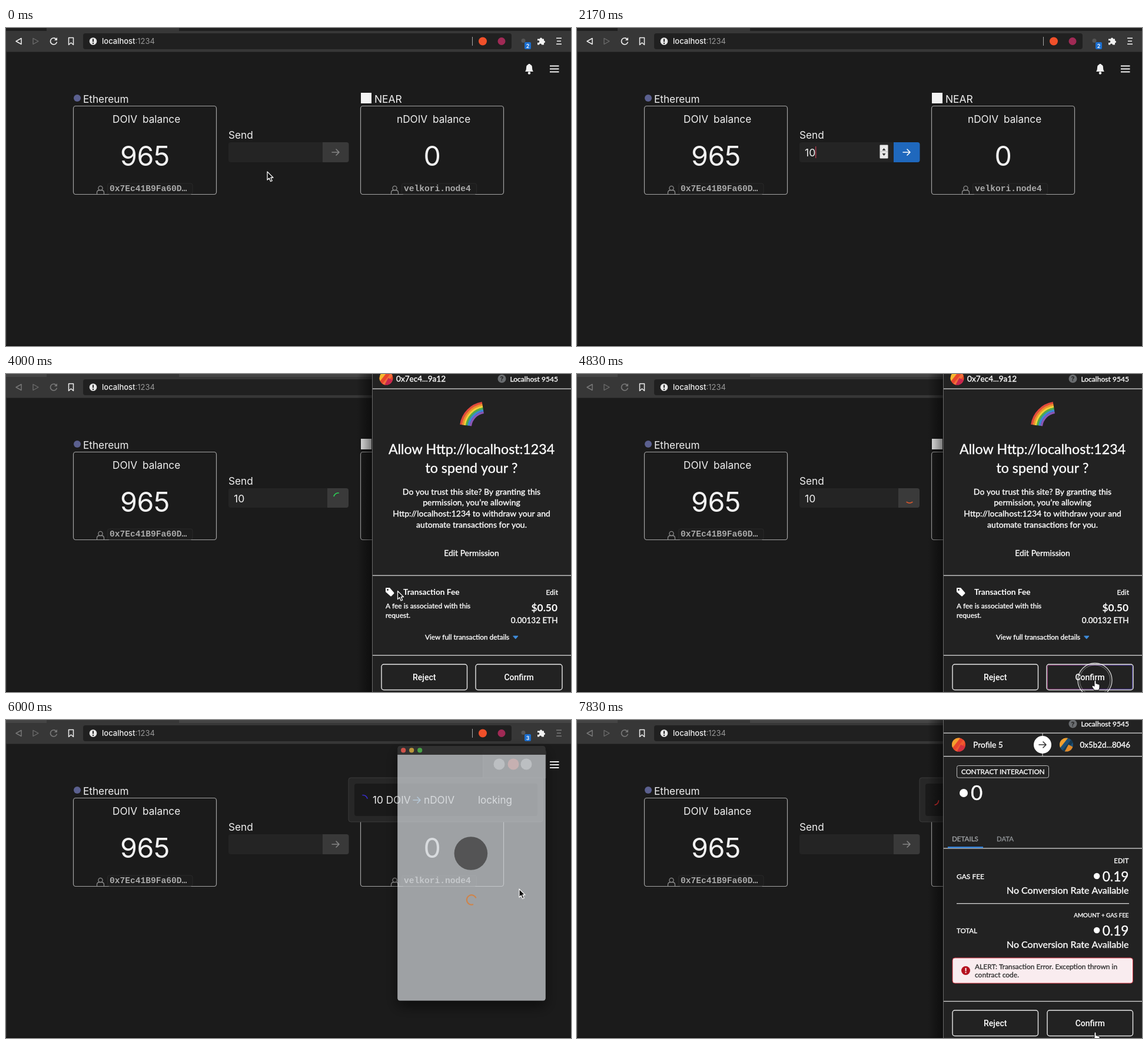
These frames come from a looping animation (960x540 px, 8 s). An HTML page with a canvas:

```html
<!DOCTYPE html>
<html lang="en">
<head>
<meta charset="utf-8">
<title>Token transfer demo</title>
<style>
html, body { margin: 0; width: 100%; height: 100%; overflow: hidden; background: #1b1b1b; }
canvas { display: block; width: 960px; height: 540px; }
</style>
</head>
<body>
<canvas id="stage" width="960" height="540"></canvas>
<script>
const LOOP = 8000, FPS = 6, TAU = Math.PI * 2;
const c = document.getElementById('stage').getContext('2d');
const UI = 'Inter, sans-serif', WALLET = 'Lato, sans-serif',
      MONO = '"Liberation Mono", monospace', BUTTON = 'Roboto, sans-serif';
const TOKEN = 'DOIV', ETH_ADDR = '0x7Ec41B9Fa60D…', NEAR_ADDR = 'velkori.node4';
const SHORT_ADDR = '0x7ec4...9a12', CONTRACT = '0x5b2d...8046', OWNER = 'Profile 5';

// ---- helpers ----
function text(s, x, y, size, color = '#f0f0f0', o = {}) {
  c.font = `${o.weight || 400} ${size}px ${o.font || UI}`;
  c.textAlign = o.align || 'left';
  c.textBaseline = 'alphabetic';
  c.fillStyle = color;
  c.fillText(s, x, y);
  if (o.thick) {
    c.strokeStyle = color;
    c.lineWidth = o.thick;
    c.lineJoin = 'round';
    c.strokeText(s, x, y);
  }
}
// Wallet type is a touch heavier than the regular cut
const wallet = (s, x, y, size, align = 'left', weight = 400, color = '#fff') =>
  text(s, x, y, size, color, { font: WALLET, align, weight, thick: weight > 400 ? 0 : .35 });

function rect(x, y, w, h, color) { c.fillStyle = color; c.fillRect(x, y, w, h); }

function box(x, y, w, h, r, fill, stroke, lw = 1) {
  c.beginPath();
  c.roundRect(x, y, w, h, r);
  if (fill) { c.fillStyle = fill; c.fill(); }
  if (stroke) { c.strokeStyle = stroke; c.lineWidth = lw; c.stroke(); }
}
function dot(x, y, r, fill) {
  c.beginPath();
  c.arc(x, y, r, 0, TAU);
  c.fillStyle = fill;
  c.fill();
}
function arc(x, y, r, from, to, color, lw) {
  c.beginPath();
  c.arc(x, y, r, from, to);
  c.strokeStyle = color;
  c.lineWidth = lw;
  c.stroke();
}
function path(d, x, y, fill, stroke, lw = 1.5) {
  const p = new Path2D(d);
  c.save();
  c.translate(x, y);
  c.lineJoin = c.lineCap = 'round';
  if (fill) { c.fillStyle = fill; c.fill(p); }
  if (stroke) { c.strokeStyle = stroke; c.lineWidth = lw; c.stroke(p); }
  c.restore();
}
// Piecewise linear track over rows [key, v1, v2, ...]
function track(rows, n) {
  let i = 0;
  while (i < rows.length - 2 && n >= rows[i + 1][0]) i++;
  const a = rows[i], b = rows[i + 1];
  const k = Math.min(1, Math.max(0, (n - a[0]) / (b[0] - a[0])));
  return a.slice(1).map((v, j) => v + (b[j + 1] - v) * k);
}

// ---- browser ----
function browser(n, s) {
  rect(0, 0, 960, 540, '#1b1b1b');
  rect(0, 0, 960, 6, s.away ? '#454545' : '#202020');
  rect(69, 0, 225, 6, '#373737');
  rect(0, 5, 960, 36, '#373737');
  rect(0, 40, 960, 1, '#2b2b2b');
  box(131, 9, 728, 27, 4, '#202020');

  const nav = s.away ? '#777' : '#eee';
  path('M5 -5 L-4 0 L5 5 Z', 21, 22.5, null, nav);
  path('M-4 -5 L5 0 L-4 5 Z', 50, 22.5, null, '#6d6d6d', 1.3);
  arc(81, 22.5, 5.5, 0.2, TAU - 0.8, nav, 1.7);
  path('M0 0 H5 V-5 Z', 82, 21, nav);
  path('M-4 -6 H4 V6 L0 2.5 L-4 6 Z', 110.5, 22.5, null, '#eee');
  dot(148, 22.5, 6.3, '#e6e6e6');
  rect(147, 18.5, 2, 5, '#202020');
  rect(147, 25, 2, 2, '#202020');
  text('localhost', 163, 27, 13, '#f2f2f2', { weight: 500 });
  text(':1234', 163 + c.measureText('localhost').width, 27, 13, '#999');

  rect(792, 15, 1, 15, '#a8a8a8');
  dot(810, 22.5, 7, '#f0502a');
  dot(842, 22.5, 6.5, '#a02a55');
  dot(879, 21.5, 3.5, '#565656');
  box(881, 24, 11, 12, 2, '#1c6fd0');
  text(s.badge, 886.5, 33.5, 9, '#fff', { align: 'center', weight: 600 });
  path('M-6 -3 H-2 A2 2 0 1 1 2 -3 H5 V0 A2 2 0 1 1 5 4 V7 H1 A2 2 0 1 0 -3 7 H-6 V3 A2 2 0 1 0 -6 0 Z', 909, 21.5, '#f2f2f2');
  for (let i = 0; i < 3; i++) rect(935 + (i === 1), 16.5 + i * 5, i === 1 ? 7 : 9, 1.6, nav);

  rect(0, 41, 1, 499, '#303030');
  rect(0, 538, 960, 2, '#141414');
}

// ---- page ----
function card(x, mid, amount, addr, addrX, h) {
  box(x + .5, 132.5, 243, h, 4, null, '#a3a3a3', 1.2);
  c.letterSpacing = '-0.5px';
  text(amount, mid, 233.5, 46.5, '#f2f2f2', { align: 'center' });
  c.letterSpacing = '0px';
  const y = 132.5 + h, w = addr.length * 8.7;
  box(addrX - 3.5, y - 18.5, w + 14, 18, 3, '#1d1d1d', '#292929');
  text(addr, addrX, y - 5.5, 14.6, '#a9a9a9', { font: MONO, weight: 700 });
  arc(addrX - 15.5, y - 10.5, 3.6, 0, TAU, '#8d8d8d', 1.3);
  path('M-6 6 V4 Q-6 0 -2 0 H2 Q6 0 6 4 V6', addrX - 15.5, y - 7, null, '#8d8d8d', 1.3);
}

function arrow(x, y, color) {
  path('M-6 0 H6 M1 -5 L6 0 L1 5', x, y, null, color, 1.6);
}

function ring(x, y, n, rows) {
  const [deg, hue] = track(rows, n), a = deg * Math.PI / 180;
  c.lineCap = 'round';
  arc(x, y, 8.5, a - .6, a + .6, `hsl(${hue} 65% 50%)`, 1.7);
  c.lineCap = 'butt';
}

function sendForm(n, s) {
  text('Send', 378, 187.5, 17.2);
  if (s.busy) {
    box(378, 194, 204, 33, 4, '#242424');
    box(546, 194, 36, 33, [0, 4, 4, 0], '#3a3a3a');
    ring(565, 210.5, n, [[14, -310, 346], [18, -20, 280], [29, 450, 15], [32, 600, -30]]);
  } else {
    box(378, 194, 204, 34, 4, '#242424');
    box(538, 194, 44.5, 34, [0, 4, 4, 0], s.value ? '#1f68bd' : '#393939');
    arrow(560, 211, s.value ? '#fff' : '#858585');
  }
  text(s.value, 387, 217.5, 17.6);
  if (s.focus) {
    box(514.5, 198.5, 14, 23, 1, '#e9e9e9');
    rect(515, 209.5, 13, 1, '#bbb');
    path('M-3 2 L0 -2 L3 2 Z', 521.5, 206, '#333');
    path('M-3 -2 L0 2 L3 -2 Z', 521.5, 215, '#333');
    if (s.caret) {
      const w = s.value ? c.measureText(s.value).width : 0;
      rect(387 + w, 201, 1, 20, '#e0405a');
    }
  }
}

function notice(n) {
  box(810.5, 50.5, 107, 48, [4, 4, 0, 0], '#272727', '#363636');
  dot(838, 75, 9.5, '#8b8b8b');
  dot(862, 75, 9.5, '#b0524a');
  dot(884, 75, 9.5, '#8b8b8b');
  box(582, 98, 330, 75, 4, '#272727', '#3b3b3b');
  box(592, 108, 311, 55, 4, '#1a1a1a');
  ring(606, 136, n, [[33, -223, 284], [36, -55, 245], [41, 225, 180], [47, 760, 0], [48, 849, -30]]);
  text('10 ' + TOKEN, 623, 142, 17.2);
  arrow(698, 136, '#6fa8d8');
  text('n' + TOKEN, 710, 142, 17.2);
  text('locking', 802, 142, 17);
}

function page(n, s) {
  if (!s.notice) {
    path('M-7 5 Q-5 3 -5 -2 Q-5 -7 0 -7 Q5 -7 5 -2 Q5 3 7 5 Z', 889, 69, '#f2f2f2');
    rect(887.5, 61, 3, 3, '#f2f2f2');
    dot(889, 76.5, 2.2, '#f2f2f2');
  }
  const my = s.notice ? 76 : 69.5;
  for (let i = -1; i < 2; i++) rect(924, my - 1 + i * 5, 15.5, 2, '#f2f2f2');

  dot(121, 119, 6, '#5b608f');
  text('Ethereum', 131, 127, 17.2);
  box(603, 110, 18, 18, 0, '#f2f2f2');
  text('NEAR', 626, 127, 17.4);
  const h = s.busy ? 149 : 150;
  card(114, 236, '965', ETH_ADDR, 176, h);
  card(602, 724, '0', NEAR_ADDR, 676, h);
  text(TOKEN, 181, 161, 17.2);
  text('balance', 232, 161, 17.2);
  text('n' + TOKEN, 664, 161, 17.2);
  text('balance', 725, 161, 17.2);
  sendForm(n, s);
  if (s.notice) notice(n);
}

// ---- wallet window ----
function avatar(x, y, colors) {
  c.save();
  c.beginPath();
  c.arc(x, y, 11.5, 0, TAU);
  c.clip();
  rect(x - 12, y - 12, 24, 24, colors[0]);
  c.translate(x, y);
  c.rotate(-.9);
  rect(-14, -13, 28, 8, colors[1]);
  rect(-14, 1, 28, 5, colors[2]);
  c.rotate(1.4);
  rect(3, -2, 14, 14, colors[3]);
  c.restore();
}
const hline = (y, x = 622, w = 338) => rect(x, y, w, 1.3, '#d5d5d5');

function network(y) {
  dot(842.5, y, 7, '#6a6d70');
  text('?', 842.5, y + 4, 10.5, '#222', { align: 'center', weight: 700 });
  wallet('Localhost 9545', 938, y + 4.5, 12.1, 'right');
}

function loader(n, second) {
  rect(622, -10, 338, 561, '#d0d3d8');
  dot(789.5, 215, 38, '#393939');
  const a = (n - (second ? 36 : 18)) * 1.05;
  arc(791, 321, 11, 1.2 + a, 5.9 + a, '#e07b2b', 3);
}

function button(label, x, w, fill, color, edge) {
  box(x, 493, w, 43.5, 4, fill, edge, 1.4);
  text(label, x + w / 2, 519.5, 14, color, { font: BUTTON, align: 'center', weight: 500 });
}

function rainbow() {
  ['#e2483d', '#f08c2e', '#f4d03a', '#4fae4d', '#3f86d8', '#8a56b8'].forEach((col, i) =>
    arc(816, 92, 43.5 - i * 3.3, 3.28, 4.55, col, 3.5));
}

function approvePage(n) {
  rect(622, 0, 338, 540, '#222');
  avatar(646, 7, ['#e8452c', '#f5b82e', '#f0703a', '#c8264f']);
  wallet(SHORT_ADDR, 663, 12.5, 13.6);
  network(8);
  hline(24.5);
  rainbow();
  wallet('Allow Http://localhost:1234', 791, 136, 23.2, 'center');
  wallet('to spend your ?', 791, 168, 23.2, 'center');
  ['Do you trust this site? By granting this', 'permission, you’re allowing',
   'Http://localhost:1234 to withdraw your and', 'automate transactions for you.']
    .forEach((s, i) => wallet(s, 791, 204.5 + i * 18.7, 14, 'center'));
  wallet('Edit Permission', 791, 308.5, 13.9, 'center');
  hline(341.5);
  path('M-7 -6 Q-7 -7 -6 -7 H0 L7 1 Q8 2 7 3 L3 7 Q2 8 1 7 L-7 0 Z', 652, 370, '#fff');
  dot(648.5, 366.5, 1.4, '#222');
  wallet('Transaction Fee', 675, 375, 13.7, 'left', 700);
  wallet('Edit', 938, 375, 12, 'right');
  wallet('A fee is associated with this', 645, 397.5, 11.9);
  wallet('request.', 645, 413.5, 11.9);
  wallet('$0.50', 937, 403, 17.4, 'right', 700);
  wallet('0.00132 ETH', 937.5, 423, 13.5, 'right');
  wallet('View full transaction details', 712, 451, 11.8);
  path('M-4 -2 H4 L0 2.5 Z', 866, 447, '#3f8fe0', '#3f8fe0', 1);
  hline(477);
  button('Reject', 638, 145.5, '#222', '#fff', '#e8e8e8');
  button('Confirm', 798, 147, '#222', '#fff', '#e8e8e8');
  if (n >= 28) {
    const g = c.createLinearGradient(798, 0, 945, 0);
    g.addColorStop(0, '#8a2a6c');
    g.addColorStop(1, '#4a3fa8');
    box(799.5, 494.5, 144, 40.5, 3, null, g);
  }
}

function feeRow(y, fee) {
  wallet(fee, 937.5, y + 8.5, 22.7, 'right');
  dot(937.5 - c.measureText(fee).width - 9.5, y, 5.2, '#fff');
  wallet('No Conversion Rate Available', 937.5, y + 29.5, 16, 'right');
}

function contractPage(n) {
  const ready = n >= 43, fee = ready ? '0.19' : '0';
  rect(622, 0, 338, 540, '#222');
  network(6.5);
  hline(21.5);
  avatar(648.5, 42, ['#e8452c', '#f5a02e', '#ef5a30', '#d23040']);
  wallet(OWNER, 673, 47, 13.9);
  rect(790.5, 22, 1, 39, '#d5d5d5');
  dot(791, 42, 15, '#fff');
  arrow(791, 42, '#333');
  avatar(831.5, 42, ['#1d4f76', '#f2a02e', '#17394f', '#e08a2a']);
  wallet(CONTRACT, 940, 47, 13.4, 'right');
  hline(61);
  box(645.5, 77.5, 156, 20.5, 3, null, '#bdbdbd');
  wallet('CONTRACT INTERACTION', 653, 92, 11.6);
  dot(657, 124, 7, '#fff');
  wallet('0', 669, 136, 35);
  wallet('DETAILS', 637, 205.5, 11.6, 'left', 400, '#a0a3a6');
  wallet('DATA', 713, 205.5, 11.4, 'left', 400, '#8c8f92');
  hline(217.3);
  rect(630, 215, 60, 2.3, '#2f80d8');
  wallet('EDIT', 937.5, 243, 11.4, 'right');
  wallet('GAS FEE', 645, 269.5, 12);
  feeRow(265, fee);
  hline(311, 645, 293);
  wallet('AMOUNT + GAS FEE', 937.5, 335, 9.8, 'right');
  wallet('TOTAL', 645, 362, 11.5);
  feeRow(357, fee);

  const h = ready ? 43 : 30.5;
  box(638, 404, 306.5, h, 4, '#f9ecef', '#d0313f');
  const iy = 404 + h / 2;
  dot(660.5, iy, 7.5, '#b5121f');
  rect(659.6, iy - 4.5, 1.9, 5.5, '#fff');
  rect(659.6, iy + 2.2, 1.9, 2, '#fff');
  const alert = ready ? ['ALERT: Transaction Error. Exception thrown in', 'contract code.']
                      : ['ALERT: Gas limit must be at least 21000'];
  alert.forEach((s, i) => wallet(s, 676, 423.5 + i * 14 - (ready ? .5 : 0), 12, 'left', 400, '#333'));

  hline(477);
  if (ready) {
    button('Reject', 638, 145.5, '#222', '#fff', '#e8e8e8');
    button('Confirm', 799, 145.5, '#222', '#fff', '#e8e8e8');
  } else {
    button('Reject', 638, 145.5, '#b9b9b9', '#f4f4f4', '#b9b9b9');
    button('Confirm', 799, 145.5, '#5a6571', '#8a929a', '#7b848d');
  }
}

// Window zooms about its centre while opening and closing
function zoomed(n, second) {
  const k = .745;
  c.save();
  c.translate(791, 260);
  c.scale(k, k);
  c.translate(-791, -260);

  // Shadow falls only outside the translucent window
  c.save();
  c.beginPath();
  c.rect(0, -100, 1200, 900);
  c.roundRect(622, -30, 338, 581, 6);
  c.clip('evenodd');
  c.shadowColor = 'rgba(0,0,0,.5)';
  c.shadowBlur = 22;
  c.shadowOffsetY = 10;
  box(622, -30, 338, 581, 6, '#000');
  c.restore();

  c.beginPath();
  c.roundRect(622, -30, 338, 581, 6);
  c.clip();
  c.globalAlpha = .73;
  loader(n, second);
  c.globalAlpha = .9;
  rect(622, -30, 338, 20, '#333');
  ['#e0564d', '#c9a13c', '#4cae4a'].forEach((col, i) => dot(635.5 + i * 18.8, -20, 5.5, col));
  c.restore();
}

function popup(n, s) {
  if (!s.popup) return;
  const second = n > 33;
  if (s.popup === 'zoom') return zoomed(n, second);
  const g = c.createLinearGradient(596, 0, 622, 0);
  g.addColorStop(0, 'rgba(0,0,0,0)');
  g.addColorStop(1, 'rgba(0,0,0,.5)');
  rect(596, 0, 26, 540, g);
  if (s.popup === 'load') loader(n, second);
  else if (s.popup === 'approve') approvePage(n);
  else contractPage(n);
  rect(622, 0, 1, 540, s.popup === 'load' ? '#bfc2c7' : '#6a6a6a');
}

// ---- pointer ----
function pointer(n) {
  if (n >= 8 && n < 17) return;
  const [x, y] = n < 17
    ? track([[0, 444, 244], [4, 446, 206]], n)
    : track([[17, 450, 216], [21, 450, 216], [27, 881, 521], [31, 881, 521],
             [35, 872, 287], [42, 872, 287], [46, 881, 531], [48, 881, 531]], n);
  if (n === 28 || n === 29) {
    const r = n === 28 ? 20 : 29;
    arc(880, 520, r, 0, TAU, 'rgba(255,255,255,.75)', 1.4);
    arc(880, 520, r - 3, 0, TAU, 'rgba(255,255,255,.4)', 1);
  }
  const beam = (n >= 2 && n < 8) || (n >= 40 && n < 43);
  const hand = (n >= 27 && n < 31) || n >= 46;
  if (beam) {
    const d = 'M-3 -7 Q0 -7 0 -5 Q0 -7 3 -7 M0 -5 V6 M-3 8 Q0 8 0 6 Q0 8 3 8 M-2 2 H2';
    const by = n >= 40 ? y : y + 5;
    path(d, x + .5, by, null, '#111', 3);
    path(d, x + .5, by, null, '#eee', 1.2);
  } else if (hand) {
    path('M-2 9 V1 Q-2 -1 -.5 -1 Q1 -1 1 1 V5 Q3 4 4 6 Q6 5 7 7 V11 Q7 14 5 16 H-2 Q-4 13 -6 10 Q-6 7 -3 8.5 Z',
      x, y, '#fff', '#111', 1);
  } else {
    path('M0 0 V14 L3.2 11 L5.6 16.5 L8.2 15.4 L5.8 10 H10 Z', x, y, '#111', '#f5f5f5', 1.3);
  }
}

// ---- timeline ----
function popupAt(n) {
  if (n === 17 || n === 31 || n === 36) return 'zoom';
  if ((n >= 18 && n < 21) || n === 30 || (n >= 37 && n < 40)) return 'load';
  if (n >= 21 && n < 30) return 'approve';
  if (n >= 40) return 'contract';
  return '';
}
function stateAt(n) {
  const pop = popupAt(n);
  return {
    popup: pop,
    away: !!pop,
    busy: n >= 14 && n < 32,
    value: n < 8 ? '' : n < 9 ? '1' : n < 32 ? '10' : '',
    focus: n >= 3 && n < 14,
    caret: n % 6 < 3,
    notice: n >= 33,
    badge: n >= 32 ? '3' : '2'
  };
}
function draw(now) {
  const n = Math.floor(((now % LOOP) + 4) * FPS / 1000) % (LOOP * FPS / 1000);
  const s = stateAt(n);
  c.clearRect(0, 0, 960, 540);
  browser(n, s);
  page(n, s);
  popup(n, s);
  pointer(n);
}
let start;
function tick(now) {
  if (start === undefined) start = now;
  draw(Math.max(0, now - start));
  requestAnimationFrame(tick);
}
draw(0);
requestAnimationFrame(tick);
</script>
</body>
</html>
```
